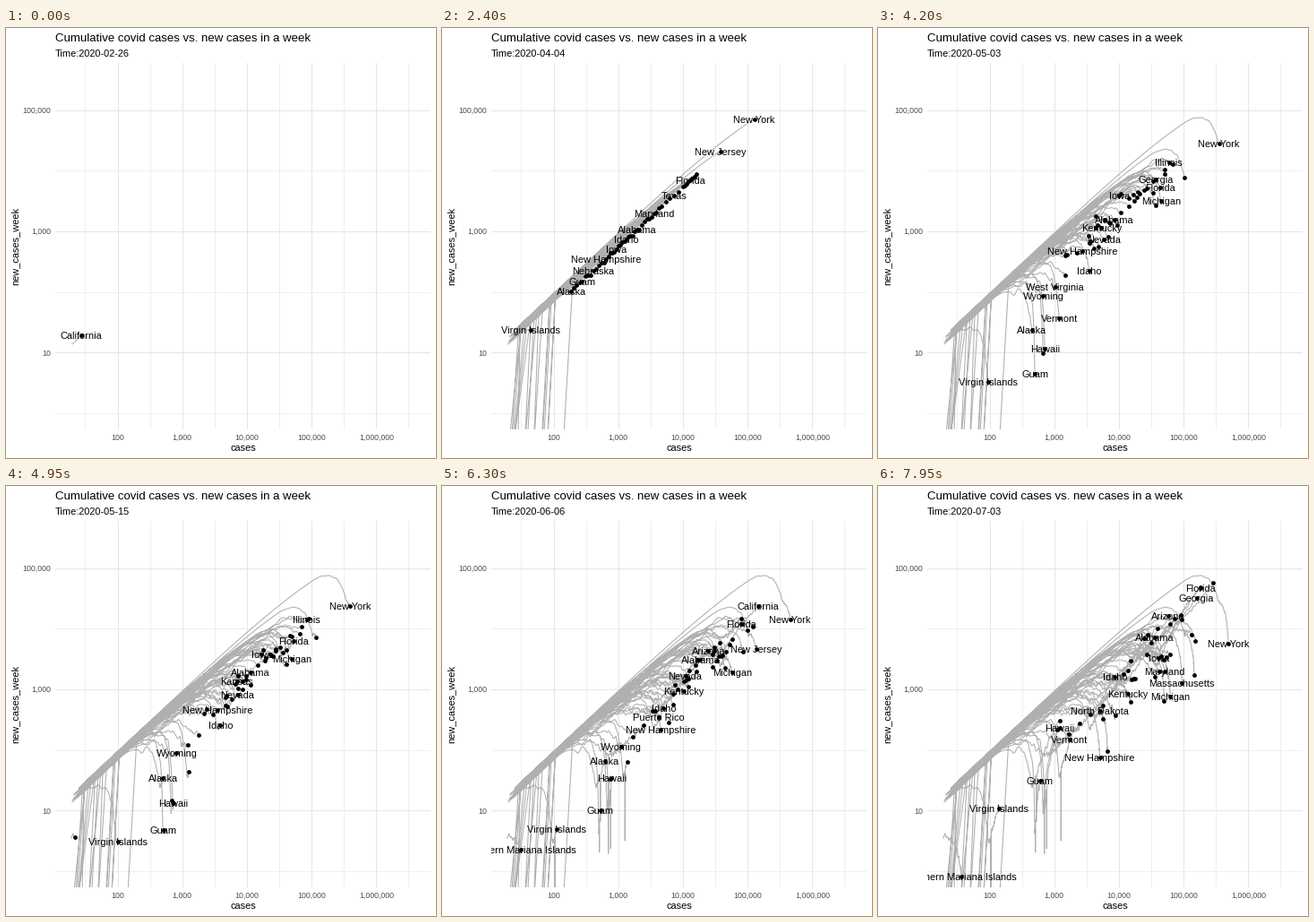
Recreate the animation shown at these times as a matplotlib script. Size 480x480 px, loop 8000 ms.

```python
import numpy as np
import matplotlib.pyplot as plt
from matplotlib.animation import FuncAnimation

plt.rcParams["font.family"] = "Liberation Sans"

SIZE, DPI = 480, 72
LEFT, RIGHT, TOP, BOTTOM = 55, 474, 39, 448
STEP_DAYS, LAST_STEP = 2.42, 53
DAYS = np.arange(-2, 131)
APRIL, MAY, JULY = 38.6, 67.6, 128.2
START_DATE = np.datetime64("2020-02-26")
rng = np.random.default_rng(7)

# States by total cases in early April.
RANKING = (
    "New York,New Jersey,Michigan,California,Louisiana,Florida,Massachusetts,"
    "Pennsylvania,Illinois,Washington,Georgia,Texas,Connecticut,Indiana,"
    "Colorado,Ohio,Tennessee,Maryland,North Carolina,Virginia,Missouri,"
    "Wisconsin,Arizona,South Carolina,Alabama,Nevada,Mississippi,Utah,"
    "Oklahoma,Idaho,Oregon,Kentucky,District of Columbia,Minnesota,Iowa,"
    "Rhode Island,Arkansas,Kansas,New Mexico,New Hampshire,Delaware,Vermont,"
    "Puerto Rico,Maine,Nebraska,Hawaii,Montana,West Virginia,Guam,"
    "South Dakota,North Dakota,Wyoming,Alaska,Virgin Islands,"
    "Northern Mariana Islands").split(",")

# Shift in height (down is positive) during spring, then during summer.
PACES = {
    "New York,New Jersey,Michigan": (28, 46),
    "Massachusetts,Connecticut,Rhode Island,New Hampshire": (-10, 58),
    "Illinois,Maryland,Virginia,Wisconsin,District of Columbia,Delaware":
        (-27, 25),
    "Pennsylvania,Indiana,Colorado,Ohio,Kentucky,Puerto Rico": (-14, 6),
    "Iowa,Nebraska,Minnesota": (-60, 5),
    "Kansas,South Dakota,North Dakota,New Mexico": (-35, -3),
    "Texas,Arizona,Utah": (-15, -58),
    "California,Georgia,Alabama,Mississippi,Tennessee,North Carolina,"
    "Arkansas": (-12, -44),
    "Florida,Nevada,South Carolina": (10, -66),
    "Washington,Missouri,Oklahoma,Oregon": (8, -36),
    "Louisiana,Idaho": (34, -58),
    "Maine,Wyoming,West Virginia": (10, -25),
    "Hawaii,Montana": (85, -90),
    "Alaska": (42, -75),
    "Vermont,Virgin Islands": (62, -40),
    "Guam": (105, -60),
    "Northern Mariana Islands": (30, 45),
}
PACE = {name: pace for names, pace in PACES.items()
        for name in names.split(",")}

UNUSUAL_STARTS = {"California": -2, "Washington": 4,
                  "Northern Mariana Islands": 75}

# A label is hidden when it would cover one named earlier.
LABEL_ORDER = (
    "New York,Florida,Michigan,Illinois,Texas,Georgia,Alabama,Maryland,Iowa,"
    "Indiana,Nevada,New Hampshire,Idaho,Guam,Hawaii,Alaska,Virgin Islands,"
    "Northern Mariana Islands,Wyoming,Vermont,Montana,Kansas,Kentucky,"
    "New Jersey,Massachusetts,Arizona,North Carolina,Tennessee,Missouri,"
    "New Mexico,Arkansas,North Dakota,West Virginia,Mississippi,Colorado,"
    "Pennsylvania,California,Connecticut,Rhode Island,Puerto Rico,Nebraska,"
    "Louisiana").split(",")


def x_of(cases):
    return 124.5 + 72.2 * (np.log10(cases) - 2)


def cases_at(x):
    return 10 ** (2 + (x - 124.5) / 72.2)


def weekly_at(y):
    return 10 ** (1 + (362 - y) / 67.7)


def diagonal(x):
    """Height at which all cases are from the last week."""
    return 294.5 - (x - 124.5) * 67.7 / 72.2


def progress(begin, end):
    return np.clip((DAYS - begin) / (end - begin), 0, 1)


def make_track(rank, name):
    """Early growth until April, then cases summed from the weekly news."""
    x_april = np.interp(rank, [0, 1, 2, 9, 14, 25, 40, 52, 53, 54],
                        [348, 310, 283, 268, 244, 214, 180, 143, 97, 73])
    y_april = diagonal(x_april) + 17
    start = UNUSUAL_STARTS.get(name, 13.5 + 0.07 * (280 - x_april))
    power = 1 if name in UNUSUAL_STARTS else 0.75
    u = progress(start, APRIL)
    early_x = 74 + (x_april - 74) * u ** power
    first_gap = 2 + 3 * rank % 10
    early_y = diagonal(early_x) + first_gap + (17 - first_gap) * u ** 4

    spring, summer = PACE[name]
    v = progress(APRIL, MAY)
    late_y = (y_april + spring * v * v * (3 - 2 * v) - 8 * np.sin(np.pi * v)
              + summer * progress(MAY, JULY) ** 1.6)
    noise = np.convolve(rng.normal(0, 1, len(DAYS)), [0.4, 0.6, 0.4], "same")
    late_y += noise * np.clip(late_y / 120, 1, 3)
    if spring > 40:
        dip_day, depth = rng.uniform(84, 96), rng.uniform(25, 100)
        late_y += depth * np.exp(-((DAYS - dip_day) / 2) ** 2)
    daily = np.where(DAYS > max(APRIL, start), weekly_at(late_y) / 7, 0)
    late_x = x_of(cases_at(x_april) + np.cumsum(daily))

    early = DAYS < APRIL
    x = np.where(early, early_x, late_x)
    y = np.maximum(np.where(early, early_y, late_y), diagonal(x) + 1)

    # Some states rise from zero a few days after their first cases.
    delay, rises = rng.integers(0, 5), rng.random() < 0.45
    if rises and name not in UNUSUAL_STARTS:
        start += delay
        y[np.argmax(DAYS >= start)] = BOTTOM + 2
    shown = DAYS >= start
    return DAYS[shown], x[shown], y[shown]


tracks = {name: make_track(rank, name) for rank, name in enumerate(RANKING)}

fig = plt.figure(figsize=(SIZE / DPI, SIZE / DPI), dpi=DPI, facecolor="white")
ax = fig.add_axes([LEFT / SIZE, 1 - BOTTOM / SIZE,
                   (RIGHT - LEFT) / SIZE, (BOTTOM - TOP) / SIZE])
ax.set(xlim=(LEFT, RIGHT), ylim=(BOTTOM, TOP))
ax.axis("off")

for i in range(11):
    ax.axvline(88.4 + 36.1 * i, color="#e6e6e6", lw=1.07 if i % 2 else 0.6)
for i in range(6):
    ax.axhline(91.5 + 67.7 * i, color="#e6e6e6", lw=0.6 if i % 2 else 1.07)


def caption(x, y, text, size, **style):
    return ax.text(x, y, text, fontsize=size, **style)


caption(55, 15, "Cumulative covid cases vs. new cases in a week", 13.2)
subtitle = caption(55, 32, "", 11)
for i in range(5):
    caption(124.5 + 72.2 * i, 460, f"{10 ** (i + 2):,}", 8.8,
            color="#4d4d4d", ha="center")
for i in range(3):
    caption(50, 94.7 + 135.4 * i, f"{10 ** (5 - 2 * i):,}", 8.8,
            color="#4d4d4d", ha="right")
caption(265, 472.5, "cases", 11, ha="center")
caption(10.5, 243.5, "new_cases_week", 11, rotation=90,
        ha="center", va="center")

trails, = ax.plot([], [], color="#b0b0b0", lw=1.07, zorder=2)
dots, = ax.plot([], [], "o", color="black", ms=4.8, mew=0, zorder=3)
tags = {name: ax.text(0, 0, name, fontsize=11.04, ha="center", clip_on=True,
                      visible=False, zorder=4) for name in LABEL_ORDER}


def overlaps(name, other, heads):
    (x1, y1), (x2, y2) = heads[name], heads[other]
    return (abs(x1 - x2) < 2.7 * (len(name) + len(other))
            and abs(y1 - y2) < 9)


def update(frame):
    now = min(frame // 3, LAST_STEP) * STEP_DAYS
    subtitle.set_text(f"Time:{START_DATE + int(now)}")

    heads, line_x, line_y = {}, [], []
    for name, (days, x, y) in tracks.items():
        if now < days[0]:
            continue
        past = days <= now
        head = np.interp(now, days, x), np.interp(now, days, y)
        heads[name] = head
        line_x += [*x[past], head[0], np.nan]
        line_y += [*y[past], head[1], np.nan]
    trails.set_data(line_x, line_y)
    dots.set_data(*zip(*heads.values()))

    placed = []
    for name, tag in tags.items():
        free = (name in heads and heads[name][1] < BOTTOM
                and not any(overlaps(name, other, heads) for other in placed))
        tag.set_visible(free)
        if free:
            placed.append(name)
            x, y = heads[name]
            tag.set_position((x, y + 4))
    return [trails, dots, subtitle, *tags.values()]


animation = FuncAnimation(fig, update, frames=160, interval=50,
                          repeat=True, repeat_delay=0, blit=False)
plt.show()
```
